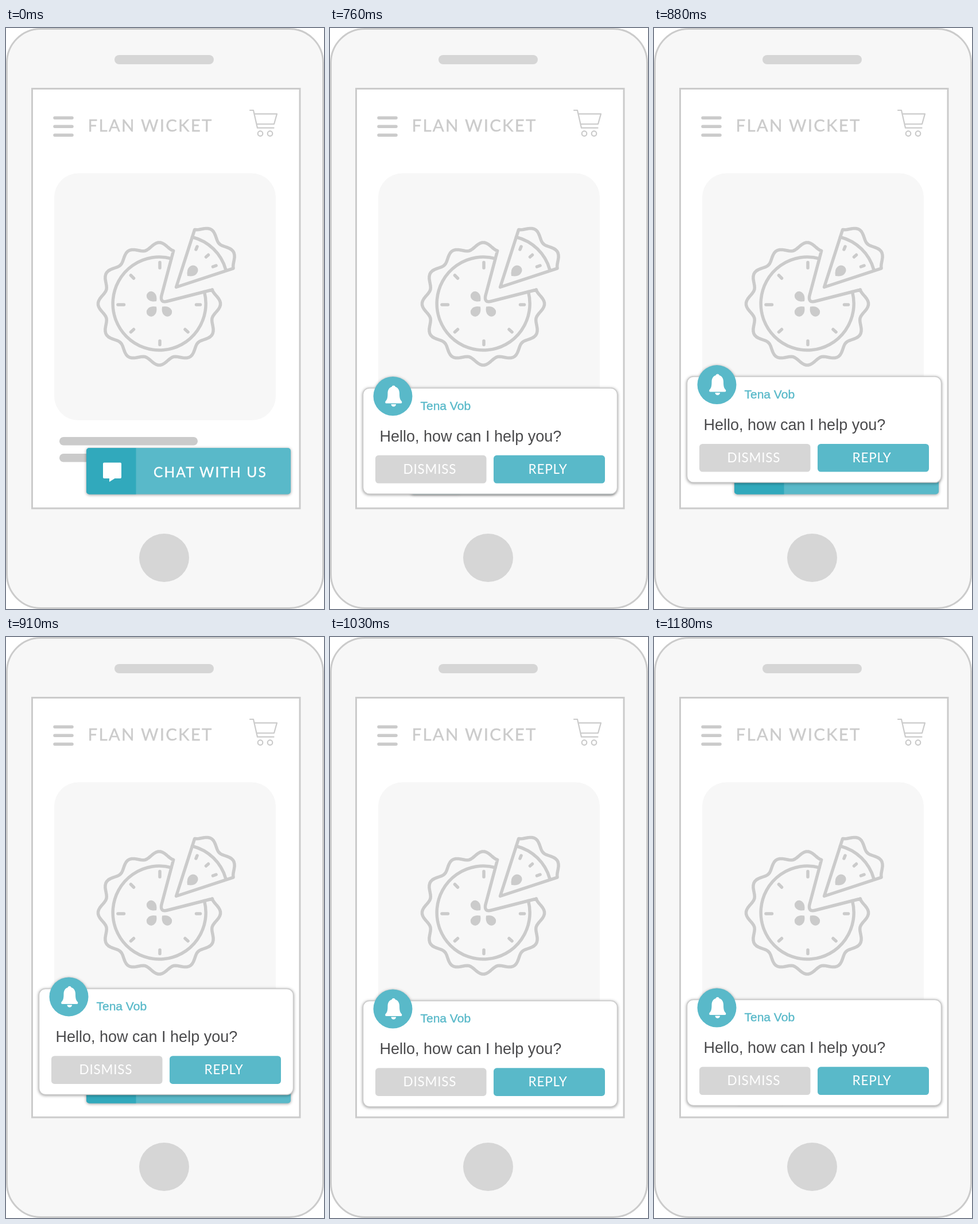
Animation of 554x1010 px, one loop 5280 ms. Source, as an HTML page:

```html
<!DOCTYPE html>
<html lang="en">
<head>
<meta charset="utf-8">
<title>Shop chat prompt</title>
<style>
  html, body { margin: 0; width: 100%; height: 100%; overflow: hidden; background: #fff; }
  svg { display: block; width: 554px; height: 1010px; }
  .caps { font-family: Lato, sans-serif; }
  .plain { font-family: "Liberation Sans", Arial, sans-serif; }
  .line { fill: none; stroke: #cbcbcb; stroke-width: 5.5; stroke-linecap: round; stroke-linejoin: round; }
  .thin { stroke-width: 2.2; }
  .grey { fill: #cbcbcb; }
  .soft { fill: #d6d6d6; }
  .teal { fill: #59b9c9; }
  .white { fill: #fff; }
  .raised { filter: drop-shadow(0 1px 2.5px rgba(0, 0, 0, .4)); }
  #card { visibility: hidden; }
</style>
</head>
<body>
<svg viewBox="0 0 554 1010">
  <defs>
    <path id="seed" d="M0 0Q6-8.5 13-8A8 8 0 0 1 13 8Q6 8.5 0 0Z"/>
  </defs>

  <!-- phone -->
  <rect x="1.5" y="1.5" width="551" height="1007" rx="59" fill="#f7f7f7" stroke="#cbcbcb" stroke-width="3"/>
  <rect class="soft" x="189" y="47" width="173" height="16" rx="8"/>
  <ellipse class="soft" cx="275.5" cy="921" rx="43.5" ry="42"/>
  <rect x="45.5" y="105.5" width="466.5" height="729.5" fill="#fff" stroke="#cbcbcb" stroke-width="3"/>

  <!-- shop header -->
  <path class="line" stroke-width="6" d="M85 156.3H115M85 171.2H115M85 186.2H115"/>
  <text class="caps grey" x="142.5" y="180" font-size="29.5" letter-spacing="2.2" stroke="#cbcbcb" stroke-width=".4">FLAN WICKET</text>
  <g class="line thin">
    <path d="M425 143H431L438 173.7H466.5M432.5 149.3H472L467 167H436.5"/>
    <circle cx="443" cy="183.5" r="4.3"/>
    <circle cx="460" cy="183.5" r="4.3"/>
  </g>

  <!-- product -->
  <rect x="84" y="252.5" width="386" height="429.5" rx="42" fill="#f7f7f7"/>
  <g class="line">
    <path id="pie"/>
    <path d="M288 400.8A81 81 0 1 0 345.5 458.5"/>
    <path d="M268 407.5V417M268 544V550.5M195 481H205.500M331.500 481H338.500M217.500 430L222.500 435M217.500 528.500L222.500 524M312 524L317 528.500"/>
    <path id="slice"/>
    <path d="M324.500 363.500A81 81 0 0 1 383 420.500"/>
    <path d="M331 385L333 380M348.500 398L352.500 394.500M360.500 415L366 413"/>
  </g>
  <g class="grey">
    <use href="#seed" transform="translate(262 475) rotate(225)"/>
    <use href="#seed" transform="translate(262 484.500) rotate(135)"/>
    <use href="#seed" transform="translate(272 484.500) rotate(45)"/>
    <use href="#seed" transform="translate(316 431) rotate(-45) scale(1.08)"/>
    <rect x="93" y="711" width="241" height="14.500" rx="7.250"/>
    <rect x="93" y="740" width="200" height="14.500" rx="7.250"/>
  </g>

  <!-- chat button -->
  <g class="raised">
    <rect class="teal" x="140" y="730" width="356" height="80.500" rx="5"/>
    <path fill="#31a9bc" d="M226.500 730H145A5 5 0 0 0 140 735V805.500A5 5 0 0 0 145 810.500H226.500Z"/>
  </g>
  <path class="white" d="M171 755.500H199A2 2 0 0 1 201 757.500V781A2 2 0 0 1 199 783H189.500L180 789V783H171A2 2 0 0 1 169 781V757.500A2 2 0 0 1 171 755.500Z"/>
  <text class="caps white" x="257" y="781.300" font-size="24.500" letter-spacing="2.100" stroke="#fff" stroke-width=".35">CHAT WITH US</text>

  <!-- message card -->
  <g id="card">
    <g class="raised">
      <rect x="57.500" y="630.500" width="443" height="184" rx="11" fill="#fff" stroke="#cbcbcb" stroke-width="1.500"/>
      <circle class="teal" cx="109.500" cy="644.500" r="34"/>
    </g>
    <g class="white">
      <circle cx="110.700" cy="629" r="3"/>
      <path d="M110.700 627.500C117.500 628 121 633 121 639.500C121 648 122 650.500 125 653.500Q126 657 123.500 657H98Q95.500 657 96.500 653.500C99.500 650.500 100.500 648 100.500 639.500C100.500 633 104 628 110.700 627.500Z"/>
      <path d="M106.500 658.500H115A4.250 4.250 0 0 1 106.500 658.500Z"/>
    </g>
    <text class="plain teal" x="157.500" y="668.300" font-size="21" stroke="#59b9c9" stroke-width=".4">Tena Vob</text>
    <text class="plain" x="86.500" y="723.300" font-size="27" fill="#4a4a4c">Hello, how can I help you?</text>
    <rect class="soft" x="79" y="747.300" width="193.500" height="48.700" rx="5.500"/>
    <rect class="teal" x="285" y="747.300" width="194" height="48.700" rx="5.500"/>
    <g class="caps white" font-size="22.500" letter-spacing=".8">
      <text x="127.500" y="779.300">DISMISS</text>
      <text x="345.500" y="779.300">REPLY</text>
    </g>
  </g>
</svg>

<script>
  const LOOP = 5280, STEP = 30;
  const card = document.getElementById('card');

  // Scalloped crust: twelve waves around a full pie, clockwise.
  function crust(cx, cy, from, to) {
    const points = [];
    for (let deg = from; deg <= to; deg += 2) {
      const a = deg * Math.PI / 180;
      const r = 101 + 5.6 * Math.cos(12 * a);
      points.push(`${(cx + r * Math.cos(a)).toFixed(1)} ${(cy + r * Math.sin(a)).toFixed(1)}`);
    }
    return 'M' + points.join('L');
  }
  document.getElementById('pie').setAttribute('d',
    crust(267, 479.5, -15, 285) + 'L271 465Q268 478.500 281 475L359.500 455Z');
  document.getElementById('slice').setAttribute('d',
    crust(304, 442.5, -75, -15) + 'L296.500 450.500Z');

  // Vertical offset of the card: [ms, px], straight between keys.
  const keys = [[700, 5.5], [880, -24.4], [1050, 5.5], [1180, 0], [LOOP, 0]];

  function offset(t) {
    const i = keys.findIndex(k => t < k[0]);
    const [t0, y0] = keys[i - 1], [t1, y1] = keys[i];
    return y0 + (y1 - y0) * (t - t0) / (t1 - t0);
  }

  function draw(now) {
    const t = now % LOOP, start = keys[0][0];
    const shown = t >= start;
    card.style.visibility = shown ? 'visible' : 'hidden';
    if (shown) {
      const held = start + Math.floor((t - start) / STEP) * STEP;
      card.setAttribute('transform', `translate(0 ${offset(held).toFixed(2)})`);
    }
  }

  const begin = performance.now();
  (function tick() {
    draw(performance.now() - begin);
    requestAnimationFrame(tick);
  })();
</script>
</body>
</html>
```
